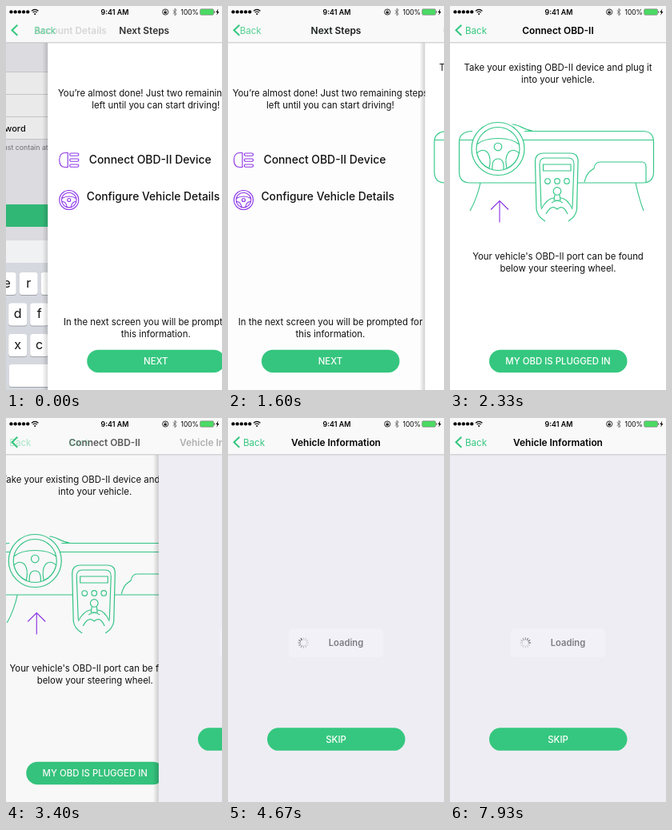
Recreate the animation shown at these times as an HTML page with a canvas. Size 270 by 480 pixels, loop 8000 ms.

```html
<!DOCTYPE html>
<html lang="en">
<head>
<meta charset="utf-8">
<title>Vehicle setup flow</title>
<style>
  html, body { margin: 0; width: 100%; height: 100%; overflow: hidden; background: #fff; }
  canvas { display: block; width: 270px; height: 480px; }
</style>
</head>
<body>
<canvas id="stage" width="270" height="480"></canvas>
<script>
const c = document.getElementById('stage').getContext('2d');
const W = 270, H = 480, BAR = 46, LOOP = 8000;
const GREEN = '#35c77f', MINT = '#34c888', PURPLE = '#8f38e8', INK = '#111';
const TITLES = ['Account Details', 'Next Steps', 'Connect OBD-II', 'Vehicle Information'];
const PUSHES = [-216, 1566, 3324];

function text(s, x, y, { size = 11.4, weight = 400, color = INK, align = 'center' } = {}) {
  c.font = `${weight} ${size}px Inter, sans-serif`;
  c.textAlign = align;
  c.fillStyle = color;
  c.fillText(s, x, y);
}
const body = (s, y) => text(s, 135, y);

function box(x, y, w, h, r, color) {
  c.fillStyle = color;
  c.beginPath();
  c.roundRect(x, y, w, h, r);
  c.fill();
}

function line(d, color, width = 1.15, fill) {
  const path = new Path2D(d);
  if (fill) { c.fillStyle = fill; c.fill(path); }
  c.strokeStyle = color;
  c.lineWidth = width;
  c.stroke(path);
}

const ring = (x, y, r) => `M${x - r} ${y}a${r} ${r} 0 1 1 ${2 * r} 0a${r} ${r} 0 1 1 ${-2 * r} 0Z`;

function button(label, y) {
  box(49, y, 172.5, 28.5, 14.25, GREEN);
  text(label, 135, y + 18.3, { size: 11.4, weight: 500, color: '#fff' });
}

function background(color) {
  c.fillStyle = color;
  c.fillRect(0, BAR, W, H - BAR);
}

function accountPage() {
  background('#efeff4');
  box(0, 82, W, 84, 0, '#fff');
  for (let y = 82; y <= 166; y += 28) box(0, y, W, 0.7, 0, '#c8c7cc');
  text('New Password', 90, 156.5, { size: 11, weight: 500, align: 'right' });
  text('Password must contain at least 8 characters', 11, 180, { size: 8.8, color: '#77777c', align: 'left' });
  box(11, 248, 248, 28, 0, GREEN);
}

function keyboard() {
  box(0, 293, W, 28, 0, '#f0f1f3');
  box(0, 321, W, 159, 0, '#d5d8de');
  const key = (x, y, w, label) => {
    box(x, y + 1, w, 28, 3.5, '#a0a3a8');
    box(x, y, w, 28, 3.5, '#fff');
    text(label, x + w / 2, y + 18.5, { size: 16 });
  };
  [['qwertyuiop', 1], ['asdfghjkl', 14.5], ['zxcvbnm', 41.5]].forEach(([row, x], i) =>
    [...row].forEach((ch, k) => key(x + k * 27, 333 + i * 38.5, 23, ch)));
  key(69, 448, 130, '');
}

function stepsPage() {
  background('#fff');
  body('You’re almost done! Just two remaining steps', 113.3);
  body('left until you can start driving!', 127.7);

  line('M25 183.5H22C16.5 183.5 14.5 187 14.5 192.5S16.5 201.5 22 201.5H25Z', PURPLE);
  for (const y of [184, 191, 198]) line(`M29 ${y}H37a1.6 1.6 0 0 1 0 3.2H29a1.6 1.6 0 0 1 0 -3.2Z`, PURPLE);
  text('Connect OBD-II Device', 51.5, 197, { size: 13.9, weight: 500, align: 'left' });

  line(ring(26.5, 242.5, 12) + ring(26.5, 242.5, 9.3) + ring(26.5, 242.5, 2) +
    'M17.5 240.5Q26.5 235.5 35.5 240.5M17.5 244.5Q23 244 24 251.5M35.5 244.5Q30 244 29 251.5', PURPLE);
  text('Configure Vehicle Details', 48.5, 243.2, { size: 13.8, weight: 500, align: 'left' });

  body('In the next screen you will be prompted for', 399.2);
  body('this information.', 413.5);
  button('NEXT', 429.7);
}

function dashboard() {
  // Dash body, hood, glove box and side posts
  line('M28 156.5Q11.5 157 11.5 170V207Q11.5 221 25 221H241Q254.5 221 254.5 207V170Q254.5 156.5 241 156.5H93' +
    'M11.5 167.5H254.5M78 148C87 148 92 155 103 156M38 221Q34 240 25 256M232 221Q236 240 242 256', MINT);
  line('M168 220C171 209 174 207 180 203Q181 195 188 195H240Q245 195 245 201V220', MINT);
  // Steering wheel
  line(ring(60, 178.5, 33), MINT, 1.2, '#fff');
  line(ring(60, 178.5, 27) + ring(60, 176, 4.8) +
    'M33.5 173C45 163 75 163 86.5 173' +
    'M33.5 184Q41 177 47 183Q52 190 49 203Q37 198 33.5 184Z' +
    'M86.5 184Q79 177 73 183Q68 190 71 203Q83 198 86.5 184Z' +
    'M53 204Q52 191 60 191Q68 191 67 204', MINT);
  // Centre console
  line('M119 269Q109 263 108 254L106.5 196Q106 184 117 184H150Q161 184 160 196L158.5 254Q157.5 263 148 269', MINT, 1.2, '#fff');
  line('M114 252L112 198Q112 190 119 190H148Q155 190 155 198L153 252M116.5 198H151V206H116.5Z' +
    ring(122, 219, 3.3) + ring(134, 219, 3.3) + ring(146, 219, 3.3), MINT);
  line('M114 254Q121 241 129 240H139Q147 241 153 254M120 260Q127 247 134 254Q141 247 147 260' +
    'M127 246Q134 241 141 246', MINT);
  line('M131 236L130 243H138L137 236' + ring(134, 231.5, 4.8), MINT, 1.15, '#fff');
  line('M62 270.5V243.5M51 254.5L62 243.5L73 254.5', PURPLE);
}

function connectPage() {
  background('#fff');
  body('Take your existing OBD-II device and plug it', 81.3);
  body('into your vehicle.', 95.7);
  dashboard();
  body("Your vehicle's OBD-II port can be found", 317.2);
  body('below your steering wheel.', 331.5);
  button('MY OBD IS PLUGGED IN', 429.7);
}

function spinner(x, y, t) {
  const head = Math.floor((t - 7680) * 12 / 1000);
  for (let i = 0; i < 12; i++) {
    const age = (((head - i) % 12) + 12) % 12;
    const a = i * Math.PI / 6, sx = Math.sin(a), sy = -Math.cos(a);
    c.strokeStyle = `rgba(85, 85, 90, ${Math.max(0.22, 0.95 - age * 0.11)})`;
    c.lineWidth = 1.1;
    c.beginPath();
    c.moveTo(x + 3.6 * sx, y + 3.6 * sy);
    c.lineTo(x + 6.8 * sx, y + 6.8 * sy);
    c.stroke();
  }
}

function vehiclePage(t) {
  background('#eeedf3');
  box(76, 263, 118, 36, 5, '#f2f1f7');
  spinner(94.3, 281, t);
  text('Loading', 147.5, 285, { size: 11.2, weight: 600, color: '#7d7c81' });
  button('SKIP', 387.3);
}

const PAGES = [accountPage, stepsPage, connectPage, vehiclePage];

function statusBar() {
  for (let i = 0; i < 5; i++) box(4.3 + i * 5.2, 5.3, 4.3, 4.3, 2.15, '#000');
  // Wi-Fi
  line('M32 6.2Q36.2 2.6 40.4 6.2M33.6 8.1Q36.2 5.9 38.8 8.1', '#000', 1.2);
  box(35.2, 8.9, 2, 2, 1, '#000');
  text('9:41 AM', 136, 10.7, { size: 8.9, weight: 600, color: '#000' });
  // Rotation lock, Bluetooth, battery and charging bolt
  line(ring(199.2, 7.5, 3.6), '#000', 0.8);
  box(197.6, 6.9, 3.2, 2.5, 0.4, '#000');
  line('M198.3 7V6.3a.9 .9 0 0 1 1.8 0V7', '#000', 0.6);
  line('M208.7 5.3L213.2 9.7L211 11.8V3.2L213.2 5.3L208.7 9.7', '#555', 0.8);
  text('100%', 229.7, 10.6, { size: 8.4, color: '#000' });
  box(242.8, 4, 16.6, 7, 1.4, '#4cd964');
  line('M244.2 3.7H258a1.6 1.6 0 0 1 1.6 1.6V9.7a1.6 1.6 0 0 1 -1.6 1.6H244.2a1.6 1.6 0 0 1 -1.6 -1.6V5.3a1.6 1.6 0 0 1 1.6 -1.6Z', '#555', 0.5);
  box(260.2, 6.2, 1, 2.6, 0.5, '#555');
  c.fillStyle = '#000';
  c.fill(new Path2D('M265.3 3.6L262.4 8H264.1L263.3 11.4L266.4 6.9H264.6Z'));
}

function navBar(from, to, p) {
  box(0, 0, W, BAR, 0, '#f9f9f9');
  box(0, BAR - 0.4, W, 0.7, 0, '#b0b0b2');
  statusBar();
  line('M14.3 23.8L7.5 30.3L14.3 36.8', GREEN, 2);

  const titleStyle = { size: 11.9, weight: 600, color: '#000' };
  const back = { size: 11.6, color: GREEN, align: 'left' };
  if (p < 1) {
    c.font = '600 11.9px Inter, sans-serif';
    const home = 135 - c.measureText(TITLES[from]).width / 2;
    const left = 19 + (home - 19) * Math.min(1, 1.18 * (1 - p));
    c.globalAlpha = (1 - p) * (1 - p / 3);
    text(TITLES[from], left, 34.5, { ...titleStyle, align: 'left' });
    c.globalAlpha = Math.max(0, 1 - 2 * p);
    text('Back', 19 - 50 * p, 34.5, back);
    c.globalAlpha = p;
    text('Back', left, 34.5, back);
  } else {
    text('Back', 19, 34.5, back);
  }
  c.globalAlpha = p;
  text(TITLES[to], 135 + 195 * (1 - p), 34.5, titleStyle);
  c.globalAlpha = 1;
}

// Critically damped spring, settled after about half a second
function push(ms) {
  const u = ms * 0.014;
  return ms > 530 ? 1 : 1 - (1 + u) * Math.exp(-u);
}

function shifted(dx, draw) {
  c.save();
  c.translate(dx, 0);
  draw();
  c.restore();
}

function render(t) {
  let from = PUSHES.length - 1;
  while (PUSHES[from] > t) from--;
  const to = from + 1, p = push(t - PUSHES[from]);
  const x = W * (1 - p);

  if (p < 1) {
    const parallax = -0.3 * W * p;
    shifted(parallax, () => PAGES[from](t));
    c.fillStyle = `rgba(0, 0, 0, ${0.1 * p})`;
    c.fillRect(0, BAR, W, H);
    if (from === 0) shifted(parallax, keyboard);
    const shade = c.createLinearGradient(x - 7, 0, x, 0);
    shade.addColorStop(0, 'rgba(0, 0, 0, 0)');
    shade.addColorStop(1, `rgba(0, 0, 0, ${Math.min(0.18, 0.8 * (1 - p))})`);
    c.fillStyle = shade;
    c.fillRect(x - 7, BAR, 7, H);
  }
  shifted(x, () => PAGES[to](t));
  navBar(from, to, p);
}

const start = performance.now();
function tick() {
  render((performance.now() - start) % LOOP);
  requestAnimationFrame(tick);
}
tick();
</script>
</body>
</html>
```
